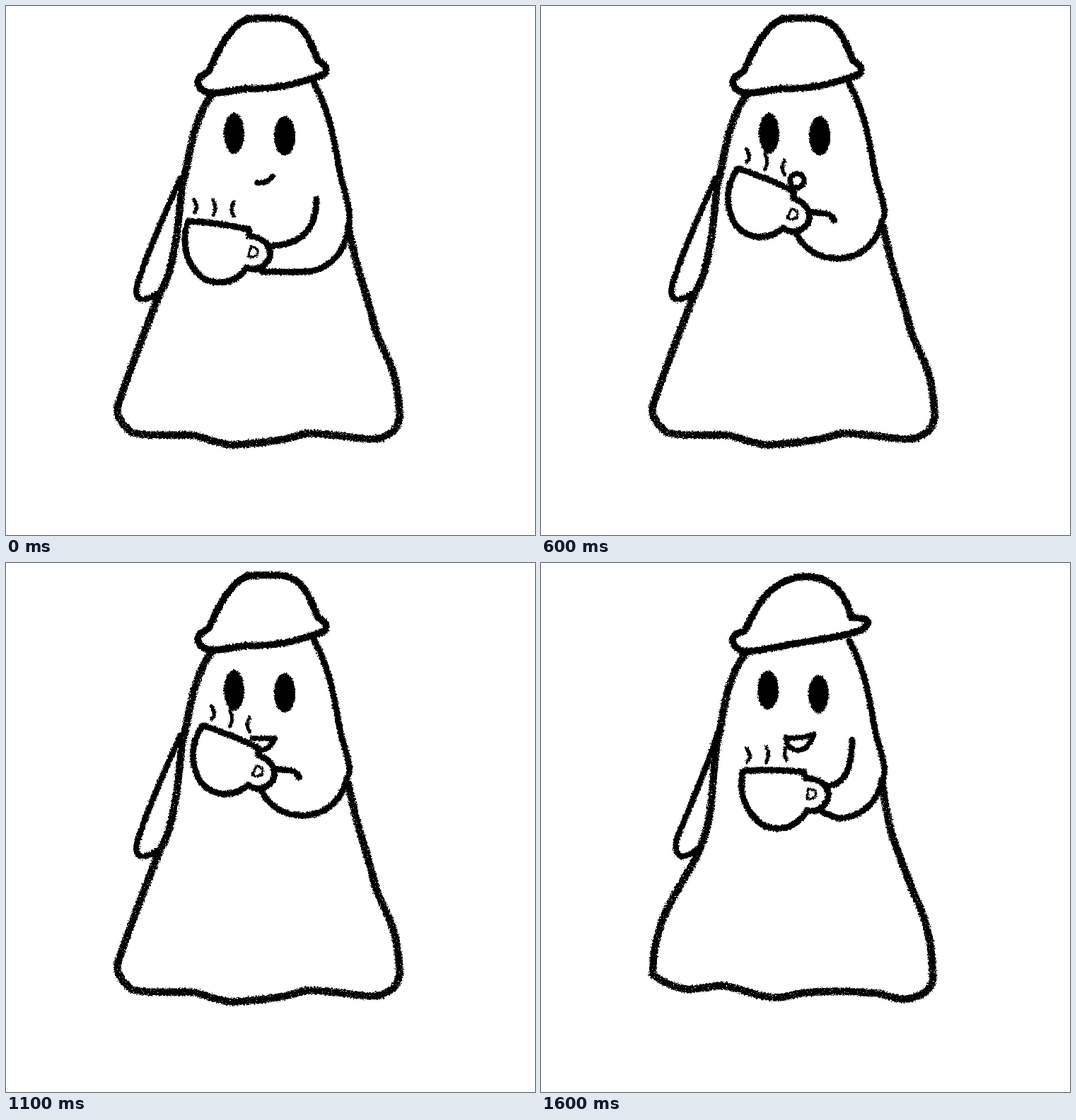
Recreate the animation shown at these times as an HTML page. Size 748 by 748 pixels, loop 1700 ms.

```html
<!DOCTYPE html>
<html lang="en">
<head>
<meta charset="utf-8">
<title>Ghost with a hot drink</title>
<style>
  html, body { margin: 0; width: 100%; height: 100%; overflow: hidden; background: #fff; }
  svg { display: block; width: 748px; height: 748px; }
  path { fill: none; stroke: #000; stroke-linecap: round; stroke-linejoin: round; }
  .body { stroke-width: 10.5; filter: url(#grain); }
  .sleeve { stroke-width: 8.5; }
  .hat { stroke-width: 10; }
  .ink { filter: url(#rough); }
</style>
</head>
<body>
<svg viewBox="0 0 748 748">
  <defs>
    <filter id="rough" filterUnits="userSpaceOnUse" x="0" y="0" width="748" height="748" color-interpolation-filters="sRGB">
      <feTurbulence type="fractalNoise" baseFrequency=".4" numOctaves="2" seed="3"/>
      <feDisplacementMap in="SourceGraphic" scale="5" xChannelSelector="R" yChannelSelector="G"/>
    </filter>
    <filter id="grain" filterUnits="userSpaceOnUse" x="0" y="0" width="748" height="748" color-interpolation-filters="sRGB">
      <feTurbulence type="fractalNoise" baseFrequency=".45" numOctaves="2" seed="8" result="noise"/>
      <feDisplacementMap in="SourceGraphic" in2="noise" scale="6" xChannelSelector="R" yChannelSelector="G" result="line"/>
      <feColorMatrix in="noise" values="0 0 0 0 0  0 0 0 0 0  0 0 0 0 0  0 0 14 0 -9.8" result="holes"/>
      <feComposite in="line" in2="holes" operator="out"/>
    </filter>
  </defs>

  <g class="ghost">
    <path class="body" d="M290,127C262,165 258,225 249,255C244,300 240,370 218,405C198,455 170,530 158,565Q153,583 178,603C200,610 235,605 265,607C300,615 305,624 340,619C380,616 395,613 425,604C470,604 505,616 530,611Q561,600 556,570C552,500 530,490 520,450C511,405 499,390 484,312"/>
    <g class="ink">
      <path class="sleeve" d="M247,243C225,293 203,340 186,393Q178,428 214,407"/>
      <path class="hat" d="M287,92C296,72 314,28 343,18Q370,16 395,18C422,25 430,50 441,77Q458,85 450,97C405,112 385,117 340,117C320,119 300,125 284,122Q264,112 275,100Z"/>
      <ellipse cx="322.5" cy="180" rx="14.5" ry="29"/>
      <ellipse cx="394" cy="183.5" rx="15" ry="28"/>
    </g>
  </g>

  <g class="ghost">
    <path class="body" d="M288,130C260,165 257,225 249,255C240,310 246,360 222,410C202,455 157,500 158,582Q178,598 207,603C235,602 250,594 270,600C300,608 320,618 345,613C385,602 440,605 480,609C500,615 510,619 525,615Q558,605 554,580C552,510 532,480 525,462C500,395 492,385 482,308"/>
    <g class="ink">
      <path class="sleeve" d="M250,240C235,290 210,345 191,393Q187,432 226,401"/>
      <path class="hat" d="M288,96C302,70 318,22 375,19C420,20 433,55 439,77Q477,78 453,95C420,107 360,112 340,118C320,120 305,127 282,124Q262,110 277,100Z"/>
      <ellipse cx="321" cy="179.5" rx="15" ry="27.5"/>
      <ellipse cx="392.5" cy="185.5" rx="14.5" ry="27"/>
    </g>
  </g>

  <g class="ink">
    <path id="arm" stroke-width="9"/>
    <g id="cup">
      <path stroke-width="9" style="fill:#fff" d="M0,0Q42,-4 86,0L88,9C118,8 125,30 119,40Q110,58 91,54C75,85 40,85 25,73C-5,50 -4,15 0,0Z"/>
      <path stroke-width="3.5" d="M92,24q13,-1 11,9q-3,6 -12,5z"/>
      <path class="wisp" stroke-width="5" d="M-2,-10Q7,1 -1,9"/>
      <path class="wisp" stroke-width="5" d="M-1,-11Q5,1 -1,11"/>
      <path class="wisp" stroke-width="5" d="M1,-10Q-5,1 1,10"/>
    </g>
    <path id="mouth" stroke-width="7.5"/>
  </g>
</svg>
<script>
const FRAME = 100, COUNT = 17;
const $ = id => document.getElementById(id);
const all = selector => [...document.querySelectorAll(selector)];
const ghosts = all('.ghost'), wisps = all('.wisp');
const lastBefore = (list, frame) => list.findLastIndex(item => item.at <= frame);

// The cup's rim corner and tilt, the lowest point of the elbow, the crook of the arm.
const poses = [
  { at: 0, x: 258, y: 304, tilt: 8, elbow: 376, crookX: 439, crookY: 273 },
  { at: 6, x: 278, y: 230, tilt: 22, elbow: 357, crookX: 414, crookY: 303 },
  { at: 11, x: 278, y: 230, tilt: 22, elbow: 357, crookX: 414, crookY: 303 },
  { at: 13, x: 264, y: 273, tilt: 3, elbow: 351, crookX: 411, crookY: 304 },
  { at: 16, x: 286, y: 294, tilt: 1, elbow: 361, crookX: 440, crookY: 250 }
];

const mouths = [
  { at: 0, d: 'M355,250Q368,252 377,241' },
  { at: 6, d: 'M372,247a10,10 0 1 1-20,0a10,10 0 1 1 20,0' },
  { at: 8, d: 'M349,249Q362,241 372,253Q373,266 358,265' },
  { at: 11, d: 'M348,248H380Q374,264 358,265' },
  { at: 13, d: 'M346,247Q366,249 386,242Q378,264 364,265Q348,264 346,247Z' }
];

function poseAt(frame) {
  const i = lastBefore(poses, frame), from = poses[i], to = poses[i + 1] || from;
  const t = (frame - from.at) / (to.at - from.at || 1);
  const eased = 1 - (1 - t) ** 1.75;
  const pose = {};
  for (const key in from) pose[key] = from[key] + (to[key] - from[key]) * eased;
  return pose;
}

function draw(frame) {
  const { x, y, tilt, elbow, crookX, crookY } = poseAt(frame);
  const sin = Math.sin(tilt * Math.PI / 180), cos = Math.cos(tilt * Math.PI / 180);
  const onCup = (u, v) => [x + u * cos - v * sin, y + u * sin + v * cos];
  const [wristX, wristY] = onCup(113, 56), [thumbX, thumbY] = onCup(117, 19);

  $('cup').setAttribute('transform', `translate(${x} ${y}) rotate(${tilt})`);
  wisps.forEach((wisp, i) =>
    wisp.setAttribute('transform', `translate(${6 + 27 * i} ${-22 - 2 * i}) rotate(${-tilt})`));
  $('arm').setAttribute('d',
    `M436,110C458,150 464,190 472,235C478,265 492,290 482,${elbow - 52}` +
    `C474,${elbow - 18} 448,${elbow} 420,${elbow}Q${wristX + 20},${elbow} ${wristX},${wristY}` +
    `M${thumbX},${thumbY}Q${crookX},${thumbY} ${crookX},${crookY}`);
  $('mouth').setAttribute('d', mouths[lastBefore(mouths, frame)].d);

  // The drawing wobbles between two versions in threes, with one early swap.
  const beat = (frame < 11 ? frame : frame + 1) % 3;
  const active = beat === 2 ? 1 : 0;
  ghosts.forEach((ghost, i) => ghost.style.display = i === active ? '' : 'none');
}

function tick() {
  draw(Math.floor(performance.now() / FRAME) % COUNT);
  requestAnimationFrame(tick);
}
tick();
</script>
</body>
</html>
```
